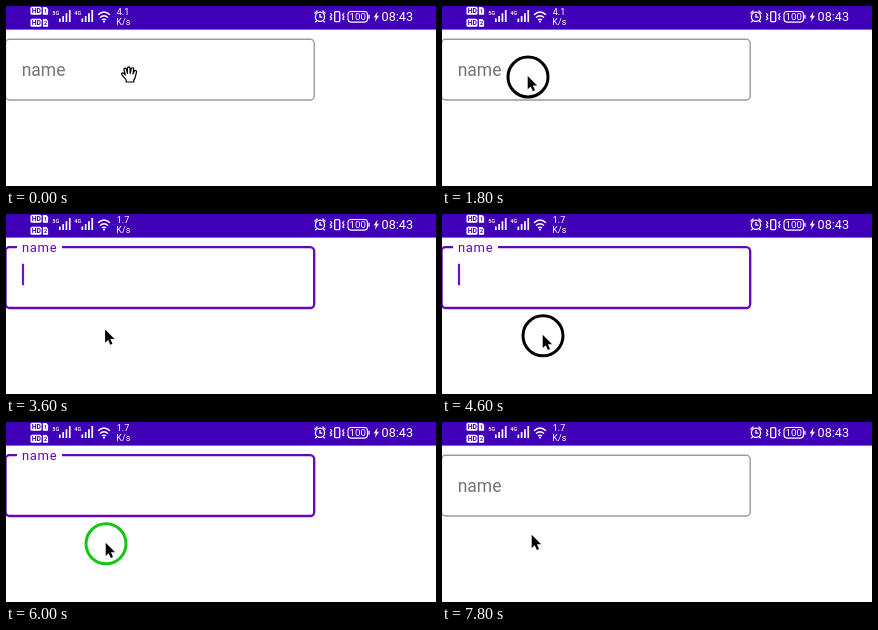
An HTML page for the animation above (8 s loop, 430 by 180 pixels).

```html
<!DOCTYPE html>
<html lang="en">
<head>
<meta charset="utf-8">
<title>Text field focus</title>
<style>
  html, body { margin: 0; width: 100%; height: 100%; overflow: hidden; background: #fff; }
  svg { display: block; width: 430px; height: 180px; font-family: Roboto, "Noto Sans", sans-serif; }
</style>
</head>
<body>
<svg viewBox="0 0 430 180">
  <defs>
    <g id="sim">
      <rect width="11" height="8" rx="1.5"/>
      <text x="1.3" y="6.5" font-size="6.8" font-weight="700" fill="#4000b8">HD</text>
      <path d="M12.4.4h3.4l1.8 1.8V8h-5.2Z"/>
    </g>
    <path id="bars" d="M0 8.5h1.7V12H0ZM3.3 6h1.7v6H3.3ZM6.6 3.2h1.7V12H6.6ZM9.9 0h1.7v12H9.9Z"/>
  </defs>

  <rect width="430" height="23.6" fill="#4000b8"/>
  <g fill="#fff">
    <use href="#sim" x="24.5" y="0.7"/>
    <use href="#sim" x="24.5" y="12.7"/>
    <g font-size="5.5" font-weight="700" fill="#4000b8">
      <text x="37.9" y="7.4">1</text>
      <text x="37.9" y="19.4">2</text>
    </g>
    <g font-size="5.5" font-weight="500">
      <text x="46.3" y="8.6">5G</text>
      <text x="68.3" y="8.6">4G</text>
    </g>
    <use href="#bars" x="53" y="4"/>
    <use href="#bars" x="75.5" y="4"/>
    <g fill="none" stroke="#fff" stroke-width="1.4">
      <path d="M92 8.8Q98 3.3 104 8.8M94 11.5Q98 7.9 102 11.5M96 13.9Q98 12.3 100 13.9"/>
    </g>
    <circle cx="98" cy="15.6" r="1.1"/>
    <g font-size="9">
      <text id="speed" x="110.8" y="8.8"></text>
      <text x="110.3" y="18.8">K/s</text>
    </g>
    <g fill="none" stroke="#fff" stroke-width="1.3">
      <circle cx="314" cy="10.8" r="4.6"/>
      <path d="M308.5 7.4 311.5 4.8M319.5 7.4 316.5 4.8M310.8 14.6 309.3 16.2M317.2 14.6 318.7 16.2"/>
      <path d="M314 8v3.2h2.4"/>
      <rect x="328.7" y="5.7" width="5" height="10" rx="1"/>
      <path d="M324.2 7.2 325.8 9 324.4 10.7 325.8 12.4 324.2 14.2M338.2 7.2 336.6 9 338 10.7 336.6 12.4 338.2 14.2" stroke-width="1.1"/>
      <rect x="342" y="5.5" width="19.5" height="10.6" rx="3" stroke-width="1.1"/>
      <path d="M363 8.8v4"/>
    </g>
    <text x="343.5" y="14.4" font-size="9.7">100</text>
    <path d="M371.5 5.6 367.7 11.4h2.2L368.8 15.8 373 9.8h-2.3Z"/>
    <text x="375.6" y="15.2" font-size="12.6">08:43</text>
  </g>

  <rect id="box" x="-0.5" y="33.2" width="308.7" height="60.8" rx="4" fill="none"/>
  <rect id="gap" y="31" height="5" fill="#fff"/>
  <text id="label">name</text>
  <rect id="caret" x="15.9" y="49.8" width="2.2" height="21.4" fill="#6a14c4"/>

  <circle id="ring" r="20" fill="none" stroke-width="3"/>
  <path id="hand" fill="#fff" stroke="#000" stroke-width="1.2" stroke-linejoin="round"
    d="M5.2 16V14Q4 12.5 2.8 11L.8 8.7Q.3 7 1.8 6.9 3 7 4.4 9L3 4Q2.8 2.3 4.2 2.2 5.2 2.3 5.6 4L6.5 7.5 6.4 2.2Q6.6.8 7.8.8 9 .9 9 2.2L9.2 7.4 10.2 2.8Q10.7 1.5 11.8 1.8 12.8 2.2 12.6 3.5L12 8 13.2 5.2Q14 4 15 4.6 15.8 5.3 15.4 6.5L14.3 11Q13.8 12.8 12.8 14V16Z"/>
  <path id="arrow" d="M0 0V13.2L3 10.4 5.2 15.2 7.3 14.3 5.2 9.5H9.4Z"
    stroke="#fff" stroke-width="1.2" paint-order="stroke"/>
</svg>
<script>
const LOOP = 8000, STEP = 200;
const PURPLE = '#6505c0', GREY = '#999', LABEL_GREY = '#747474';
const $ = id => document.getElementById(id);
const set = (id, attrs) => {
  for (const name in attrs) $(id).setAttribute(name, attrs[name]);
};
const show = (id, on) => set(id, { visibility: on ? 'visible' : 'hidden' });
const mix = (a, b, p) => a + (b - a) * p;
const ramp = (t, from, to) => Math.min(1, Math.max(0, (t - from) / (to - from)));
const ease = p => p * p * (3 - 2 * p);
const within = (t, spans) => spans.some(([from, to]) => t >= from && t < to);

const caretOn = [[2400, 2800], [3200, 3800], [4200, 4800], [5200, 6000]];
const presses = [1800, 4600, 7400];
const releases = [2000, 4800, 6000, 7600];

// [start, end, x, y]: the arrow glides to x, y between the two times
const moves = [[2800, 3800, 100.7, 120.8], [4800, 5000, 99.7, 120.8], [6400, 6800, 89.7, 112.8]];

function arrowAt(t) {
  let x = 85.7, y = 70;
  for (const [from, to, toX, toY] of moves) {
    const p = ease(ramp(t, from, to));
    x = mix(x, toX, p);
    y = mix(y, toY, p);
  }
  return [x, y];
}

function drawField(t) {
  const focused = t >= 2200 && t < 7600;
  const float = Math.min(ramp(t, 2000, 2400), ramp(t, 7800, 7400));
  set('box', { stroke: focused ? PURPLE : GREY, 'stroke-width': focused ? 2.3 : 1.4 });
  set('gap', { x: 33.5 - 22.5 * float, width: 45 * float });
  set('label', {
    x: mix(15.7, 15.9, float),
    y: mix(70, 38.3, float),
    'font-size': mix(17.5, 13, float),
    'letter-spacing': mix(0, 0.7, float),
    fill: focused ? PURPLE : LABEL_GREY
  });
  show('caret', within(t, caretOn));
}

function drawPointer(t) {
  const [x, y] = arrowAt(t);
  const glide = ease(ramp(t, 0, 1000));
  const pressed = presses.includes(t);
  show('hand', t < 1800);
  show('arrow', t >= 1800);
  show('ring', pressed || releases.includes(t));
  set('hand', { transform: `translate(${mix(115, 77.5, glide)} ${mix(60, 62, glide)})` });
  set('arrow', { transform: `translate(${x} ${y})` });
  set('ring', { cx: x + 0.3, cy: y + 1, stroke: pressed ? '#000' : '#0fc80f' });
}

function draw(now) {
  const t = Math.floor(now % LOOP / STEP) * STEP;
  $('speed').textContent = t < 3400 ? '4.1' : '1.7';
  drawField(t);
  drawPointer(t);
  requestAnimationFrame(() => draw(performance.now() - start));
}

const start = performance.now();
draw(0);
</script>
</body>
</html>
```
